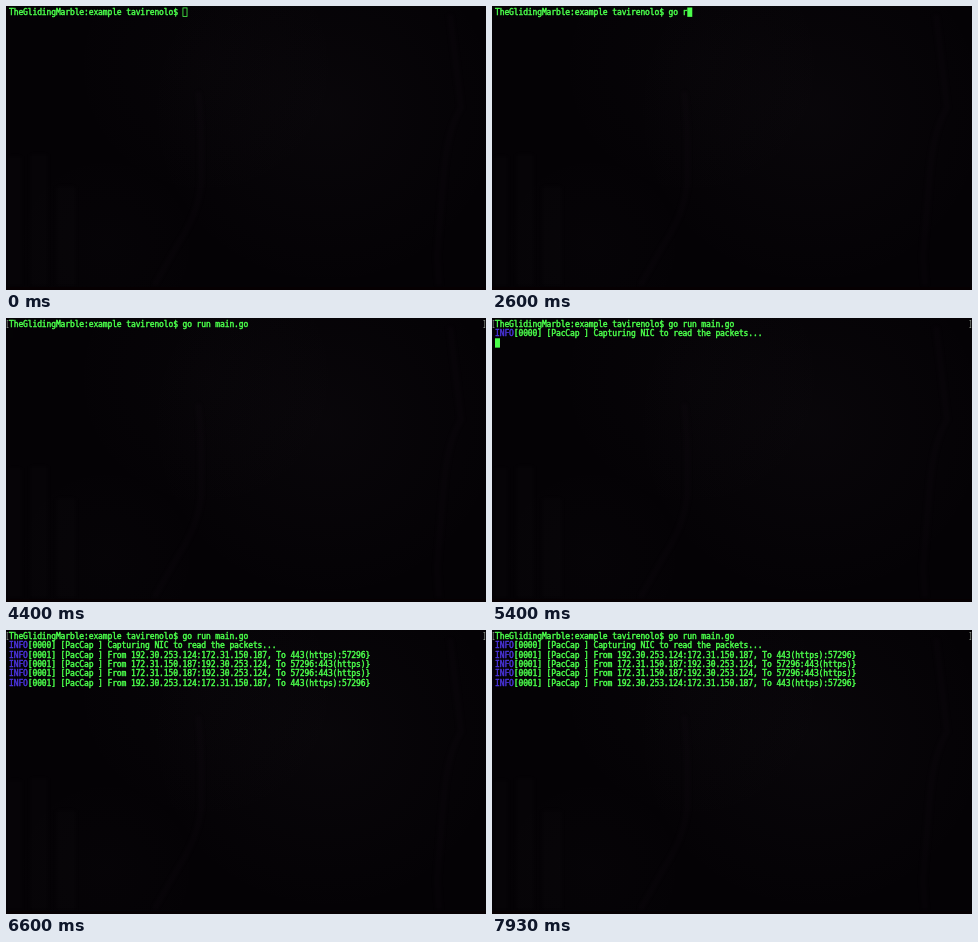
Write an HTML page with a canvas that moves like this. It is 480 px wide and 284 px high and loops after 8000 ms.

```html
<!DOCTYPE html>
<html lang="en">
<head>
<meta charset="utf-8">
<title>Terminal session</title>
<style>
  html, body { margin: 0; width: 100%; height: 100%; overflow: hidden; background: #040205; }
  canvas { display: block; width: 480px; height: 284px; }
</style>
</head>
<body>
<canvas id="stage" width="480" height="284"></canvas>
<script>
const W = 480, H = 284, LOOP = 8000;
const ctx = document.getElementById('stage').getContext('2d');

const GREEN = '#4bff4b', BLUE = '#4a34dc', MARK = '#8b938b';
// A 12px face on a 7 x 14 grid, scaled down to the stage
const CELL = 4.69, ROW = CELL * 2, SIZE = CELL * 12 / 7;
const LEFT = 3, TOP = 1.5, BASE = 8.8;
const PROMPT = 'TheGlidingMarble:example tavirenolo$ ';

// [time, typed command]
const KEYS = [
  [0, ''], [1770, 'g'], [1900, 'go'], [2130, 'go '],
  [2470, 'go r'], [2670, 'go ru'], [2740, 'go run'], [2800, 'go run '],
  [3200, 'go run m'], [3330, 'go run main.go ']
];
const ENTER = 3670;

const A = '192.30.253.124', B = '172.31.150.187';
const inbound = `From ${A}:${B}, To 443(https):57296}`;
const outbound = `From ${B}:${A}, To 57296:443(https)}`;

// [time, seconds counter, message]
const LOG = [
  [4470, '0000', 'Capturing NIC to read the packets...'],
  [5470, '0001', inbound],
  [5530, '0001', outbound],
  [5600, '0001', outbound],
  [5600, '0001', inbound]
];

// [start, end, cursor opacity at end]
const FADES = [
  [1130, 1470, 0], [1670, 1770, 1],
  [3800, 4070, 0], [4400, 4670, 1],
  [6270, 6540, 0], [6870, 7130, 1],
  [7600, 7930, 0]
];

const backdrop = makeBackdrop();

function makeBackdrop() {
  const layer = document.createElement('canvas');
  layer.width = W;
  layer.height = H;
  const g = layer.getContext('2d');
  g.fillStyle = '#040205';
  g.fillRect(0, 0, W, H);

  const glow = (x, y, r, alpha) => {
    const grad = g.createRadialGradient(x, y, 0, x, y, r);
    grad.addColorStop(0, `rgba(150,135,155,${alpha})`);
    grad.addColorStop(1, 'rgba(150,135,155,0)');
    g.fillStyle = grad;
    g.fillRect(0, 0, W, H);
  };
  glow(320, 105, 180, 0.03);
  glow(200, 60, 140, 0.016);
  glow(100, 240, 100, 0.012);

  g.filter = 'blur(2px)';
  g.lineJoin = 'round';
  g.strokeStyle = 'rgba(160,145,160,0.025)';
  g.lineWidth = 6;
  g.stroke(new Path2D('M192 85Q196 110 195 178Q192 208 172 238L148 280'));
  g.stroke(new Path2D('M444 8L449 50L455 102Q442 122 438 165L431 250L433 280'));

  g.fillStyle = 'rgba(150,140,155,0.018)';
  [[2, 150, 14], [24, 148, 18], [50, 180, 20]].forEach(([x, y, w]) => g.fillRect(x, y, w, 280 - y));
  g.filter = 'none';

  g.fillStyle = '#060002';
  g.fillRect(0, 281, W, 3);
  return layer;
}

function write(str, col, row, color) {
  ctx.save();
  ctx.translate(LEFT + col * CELL, BASE + row * ROW);
  ctx.scale(0.1, 0.1);
  ctx.font = `${SIZE * 10}px "DejaVu Sans Mono", monospace`;
  ctx.fillStyle = ctx.strokeStyle = color;
  ctx.lineWidth = 4.5;
  ctx.lineJoin = 'round';
  [...str].forEach((ch, i) => {
    ctx.fillText(ch, i * CELL * 10, 0);
    ctx.strokeText(ch, i * CELL * 10, 0);
  });
  ctx.restore();
}

function cursorAlpha(t) {
  let alpha = 1;
  for (const [start, end, to] of FADES) {
    if (t < start) break;
    alpha += (to - alpha) * Math.min(1, (t - start) / (end - start));
  }
  return alpha;
}

function drawCursor(col, row, t) {
  const x = LEFT + col * CELL, y = TOP + row * ROW;
  if (t < 70) {
    ctx.strokeStyle = GREEN;
    ctx.lineWidth = 0.8;
    ctx.strokeRect(x + 0.4, y + 0.4, CELL - 0.6, ROW - 0.9);
    return;
  }
  ctx.globalAlpha = cursorAlpha(t);
  ctx.fillStyle = GREEN;
  ctx.fillRect(x, y, CELL + 0.3, ROW);
  ctx.globalAlpha = 1;
}

function drawMark(x, dir) {
  ctx.fillStyle = MARK;
  ctx.fillRect(x, 2, 0.7, 8);
  for (const y of [2, 9.3]) ctx.fillRect(dir > 0 ? x : x - 1, y, 1.7, 0.7);
}

function draw(t) {
  ctx.drawImage(backdrop, 0, 0);

  const command = KEYS.filter(([at]) => at <= t).pop()[1];
  const lines = LOG.filter(([at]) => at <= t);
  write(PROMPT + command, 0, 0, GREEN);

  lines.forEach(([, sec, msg], i) => {
    write('INFO', 0, i + 1, BLUE);
    write(`[${sec}] [PacCap ] ${msg}`, 4, i + 1, GREEN);
  });

  if (t >= 3330) drawMark(478.4, -1);
  if (t >= ENTER) {
    drawMark(0.8, 1);
    drawCursor(0, lines.length + 1, t);
  } else {
    drawCursor(PROMPT.length + command.length, 0, t);
  }
}

const begin = performance.now();
function tick() {
  draw((performance.now() - begin) % LOOP);
  requestAnimationFrame(tick);
}
tick();
</script>
</body>
</html>
```
